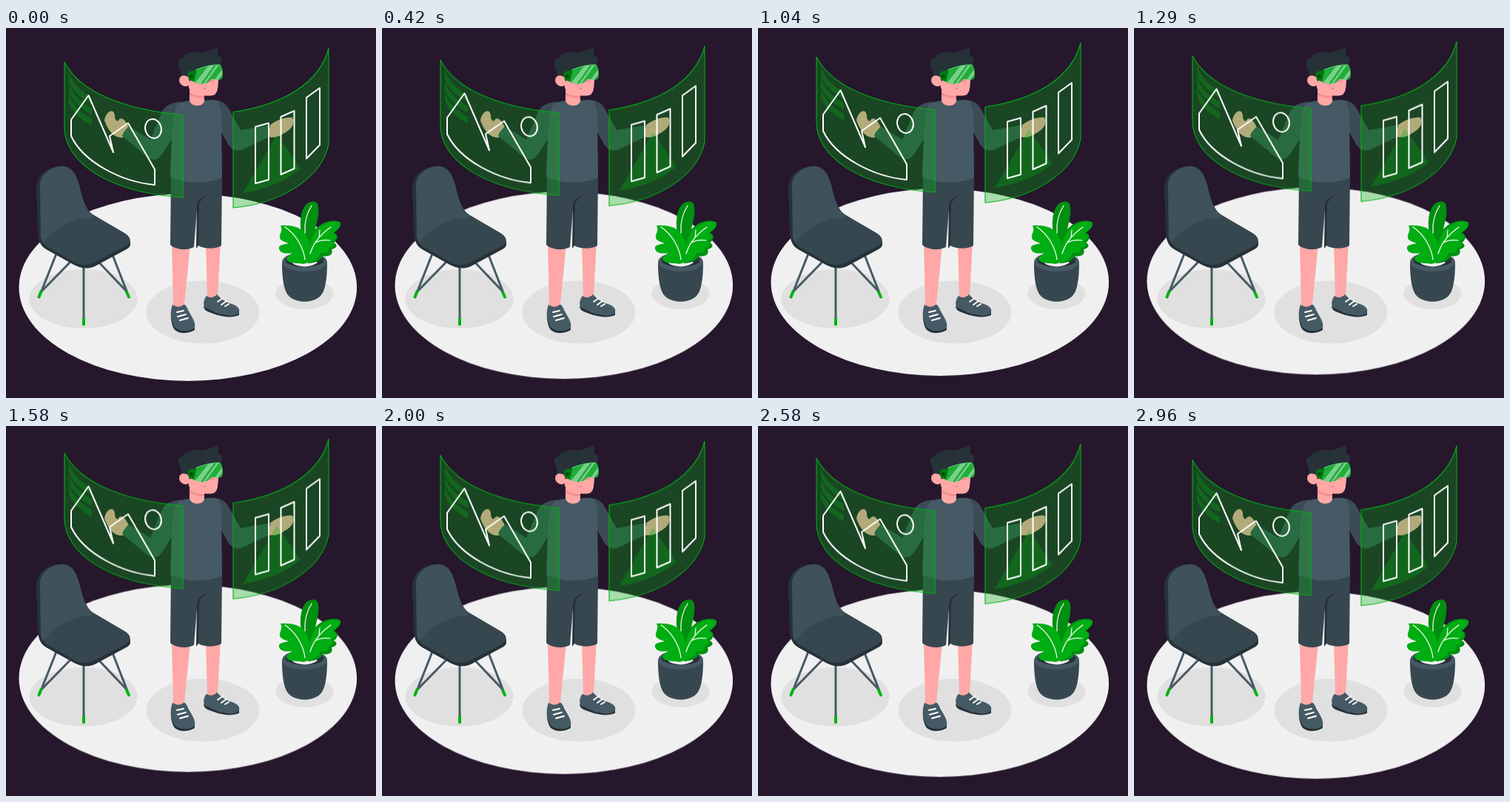
An HTML page for the animation above (3000 ms loop, 500 px wide and 500 px high).

```html
<!DOCTYPE html>
<html lang="en">
<head>
<meta charset="utf-8">
<title>Virtual room</title>
<style>
  html, body { margin: 0; width: 100%; height: 100%; overflow: hidden; background: #26172d; }
  svg { display: block; width: 100vw; height: 100vh; }
  .float { animation: float 3s linear infinite; }
  @keyframes float { 50% { transform: translateY(-10px); } }
  .shadow { fill: #e0e0e0; }
  .skin { fill: #ffa8a7; }
  .shirt { fill: #455a64; }
  .sleeve { fill: #3b4c56; }
  .slate { fill: #37474f; }
  .ink { fill: #263238; }
  .line { fill: none; stroke: #fff; stroke-width: 2; stroke-linejoin: round; stroke-linecap: round; }
  .thin { stroke-width: 1.2; }
  .glass { fill: #00b212; fill-opacity: .3; stroke: #00b212; stroke-width: 1.1; }
  .glow { fill: #00b212; opacity: .3; }
  .leaf { fill: #00ad12; }
  .leafDark { fill: #008f10; }
  .leg { fill: none; stroke: #455a64; stroke-width: 3; }
  .tip { fill: none; stroke: #00b212; stroke-width: 4; stroke-linecap: round; }
</style>
</head>
<body>
<svg viewBox="0 0 500 500">
  <defs>
    <clipPath id="lens"><path d="M258 56 C268 52 280 49 290 50 C293 55 294 62 292 68 C289 71 284 70 280 69 C276 69 274 74 270 75 C264 76 258 75 254 73 Z"/></clipPath>
    <path id="band" d="M85 60 C90 75 101 85 116 94 V103 C101 95 89 84 85 72 Z"/>
  </defs>

  <ellipse class="float" cx="245.8" cy="350.5" rx="228.3" ry="126.5" fill="#f0f0f0"/>
  <ellipse class="shadow" cx="104.5" cy="366" rx="73" ry="40"/>
  <ellipse class="shadow" cx="266" cy="384" rx="76.5" ry="42.5"/>
  <ellipse class="shadow" cx="403.5" cy="359" rx="39" ry="21"/>

  <g id="chair">
    <path class="leg" d="M68 305 L47 358 M88 315 L48 356 M105 318 V394 M125 316 L163 356 M143 304 L164 358"/>
    <path class="tip" d="M47.500 356 L44.500 363.500 M105 393 V400.500 M163 357 L166 363.500"/>
    <path class="ink" d="M41 218 C41 201 51 190 70 187 C88 184 95 196 99 212 C104 231 108 246 117 252 L161 278 C167 282 168 286 168 292 C168 296 165 298 161 300 L122 321 C111 327 100 325 90 319 L54 299 C46 294 43 286 43 274 Z"/>
    <path class="slate" d="M46 212 C47 199 58 189 73 187 C89 186 95 198 99 213 C104 232 108 246 117 252 L160 277 C170 283 170 290 161 295 L121 316 C110 322 99 321 90 315 L58 297 C50 292 47 287 47 276 Z"/>
    <path d="M46 212 C47 199 58 189 73 187 C89 186 95 198 99 213 C103 230 107 246 117 252 C119 255 116 257 109 257 C88 258 64 272 50 290 C47 285 47 281 47 276 Z" fill="#3f515b"/>
  </g>

  <g id="plant">
    <path class="slate" d="M373 317 C373 341 376 357 383 363 C393 372 414 372 424 363 C431 357 434 341 434 317 Z"/>
    <ellipse cx="403.500" cy="316" rx="30.500" ry="13" fill="#455a64"/>
    <ellipse class="ink" cx="403.500" cy="314" rx="26" ry="9"/>
    <path d="M387 318 C397 324 412 324 421 317 L412 310 L391 311 Z" fill="#f0f0f0"/>
    <path class="leafDark" d="M402 287 C396 272 396 248 406 238 C412 233 421 233 422 241 C424 255 418 267 416 283 L406 302 Z"/>
    <path class="leafDark" d="M406 312 C407 298 410 279 420 270 C429 261 445 257 452 264 C453 270 447 273 443 277 C450 279 449 286 443 290 C449 293 447 298 440 299 C443 306 436 310 428 308 C427 314 416 318 408 318 Z" />
    <path class="leaf" d="M408 315 C409 299 411 281 421 272 C430 264 444 258 452 263 C452 270 446 273 442 277 C448 280 448 285 440 288 C445 291 443 296 436 297 C438 303 431 306 425 304 C425 311 416 316 408 317 Z"/>
    <path class="leaf" d="M371 267 C384 266 398 268 405 279 C411 289 413 300 411 311 C411 318 402 320 397 318 C388 318 379 317 379 311 C383 307 385 306 386 304 C376 306 368 303 369 296 C371 292 379 292 382 291 C372 288 369 285 370 281 C371 275 374 273 371 267 Z"/>
    <path class="line thin" d="M377 269 C391 278 402 296 404 313 M413 240 C406 251 403 263 404 277 M411 305 C415 291 425 279 439 269 M423 283 L424 273 M418 290 C425 286 431 286 438 287"/>
  </g>

  <g id="person">
    <path class="skin" d="M224 292 L226 375 C230 379 237 379 241 374 L249 292 Z M270 290 L272 363 C276 367 283 366 286 362 L290 290 Z"/>
    <path class="ink" d="M223 382 C222 392 224 403 228 408 C235 414 248 413 255 408 L255 402 Z M267 376 C268 383 273 383 280 386 C293 391 307 392 315 388 L315 381 Z"/>
    <path class="shirt" d="M225 374 C222 381 222 392 227 403 C232 411 249 411 255 405 C257 397 250 389 246 381 C244 376 242 373 240 374 C235 378 230 377 225 374 Z"/>
    <path class="shirt" d="M271 362 C267 366 266 375 269 378 C277 380 283 386 293 387 C303 390 312 389 315 384 C317 377 309 374 302 372 C294 369 289 364 285 360 C281 365 275 365 271 362 Z"/>
    <path class="line" d="M231 384 L240 382 M232 390 L243 387 M235 395 L246 392 M286 370 L293 365 M291 374 L298 369 M296 376 L301 373"/>

    <path class="slate" d="M223 198 L222 293 C229 300 246 301 254 296 L258 246 L260 294 C268 299 284 299 291 294 L292 198 Z"/>
    <path class="ink" d="M257 298 L258 240 C259 231 265 228 274 225 C266 230 262 233 261 240 L260 294 Z"/>

    <path class="skin" d="M133 125 C134 117 140 110 145 113 C149 118 145 124 151 126 C155 119 160 122 166 134 L158 148 C148 149 139 142 133 125 Z"/>
    <path class="skin" d="M353 147 L357 131 C366 124 378 120 387 121 C391 129 386 137 376 142 C370 147 362 149 353 147 Z"/>
    <path class="sleeve" d="M236 100 C221 101 215 106 211 113 L195 151 L166 133 C162 137 158 141 157 146 L191 174 C200 181 207 177 212 169 L233 136 Z"/>
    <path class="sleeve" d="M280 97 C290 97 297 102 301 109 L317 138 L357 131 C356 137 355 142 354 148 L320 164 C311 168 305 164 300 157 L284 128 Z"/>
    <path class="shirt" d="M233 101 L248 98 H268 L280 97 C287 98 290 105 291 114 L292 202 C275 211 240 211 222 201 L224 145 C225 127 226 112 233 101 Z"/>
    <path class="skin" d="M248 78 V98 C250 107 266 107 268 99 V82 Z"/>
    <path d="M248 87 C254 91 261 92 268 92 V95 C260 95 253 93 248 90 Z" fill="#f28f8f"/>
    <path class="skin" d="M246 55 C260 47 279 45 285 54 L287 72 C286 82 286 89 280 91 C268 93 252 90 247 81 Z"/>
    <path class="ink" d="M237 66 C236 61 237 58 235 55 C231 49 231 43 239 40 C243 34 252 31 263 33 C272 32 281 29 285 26 C287 30 287 34 286 37 C291 38 293 42 292 47 C285 53 270 52 257 56 L249 72 Z"/>
    <path class="skin" d="M247 67 C241 62 234 64 234 71 C235 78 243 81 248 77 Z"/>
    <path d="M266 82 C267 81 269 81 270 82" fill="none" stroke="#e06f75" stroke-width="1"/>
    <path d="M274 74 C275 71 279 69 281 70 L280 73 Z" fill="#f28f8f"/>
    <path d="M246 60 C251 57 256 57 259 57 L256 73 C251 72 247 70 246 67 Z" fill="#007a10"/>
    <circle cx="250.500" cy="65" r="2.500" fill="#004d0a"/>
    <g clip-path="url(#lens)">
      <path d="M250 45 H298 V80 H250 Z" fill="#1fae3a"/>
      <path d="M254 76 L276 48 H283 L262 77 Z M265 77 L286 48 H289 L268 77 Z M281 71 L292 56 V63 L286 71 Z" fill="#fff" opacity=".4"/>
    </g>
    <path d="M258 56 C268 52 280 49 290 50" fill="none" stroke="#5dca70" stroke-width="1"/>
  </g>

  <g class="float">
    <path class="glass" d="M79 46 C99 85 155 110 239 117.500 V229 C135 222 79 180 79 134 Z"/>
    <use href="#band" class="glow"/>
    <use href="#band" class="glow" y="14.500"/>
    <use href="#band" class="glow" y="29"/>
    <path class="line" d="M88 124 L111.500 91 L145 168 L140 146 L165 128.500 L201 191 V212 C157 208 105 182 88 146 Z"/>
    <ellipse class="line" cx="199" cy="136" rx="10.800" ry="13" transform="rotate(-14 199 136)"/>

    <path class="glass" d="M307 113.500 C373 104 424 75 436 27 V157 C427 202 373 237 307 243 Z"/>
    <path class="glow" d="M366 144 L398 190 C380 206 352 218 320 223 Z"/>
    <path class="line" d="M337 133.500 L355 128.500 V205 L337 210 Z M371.500 120 L389.500 112 V190 L371.500 198 Z M406 94 L424 81 V158 L406 176.500 Z"/>
  </g>
</svg>
</body>
</html>
```
